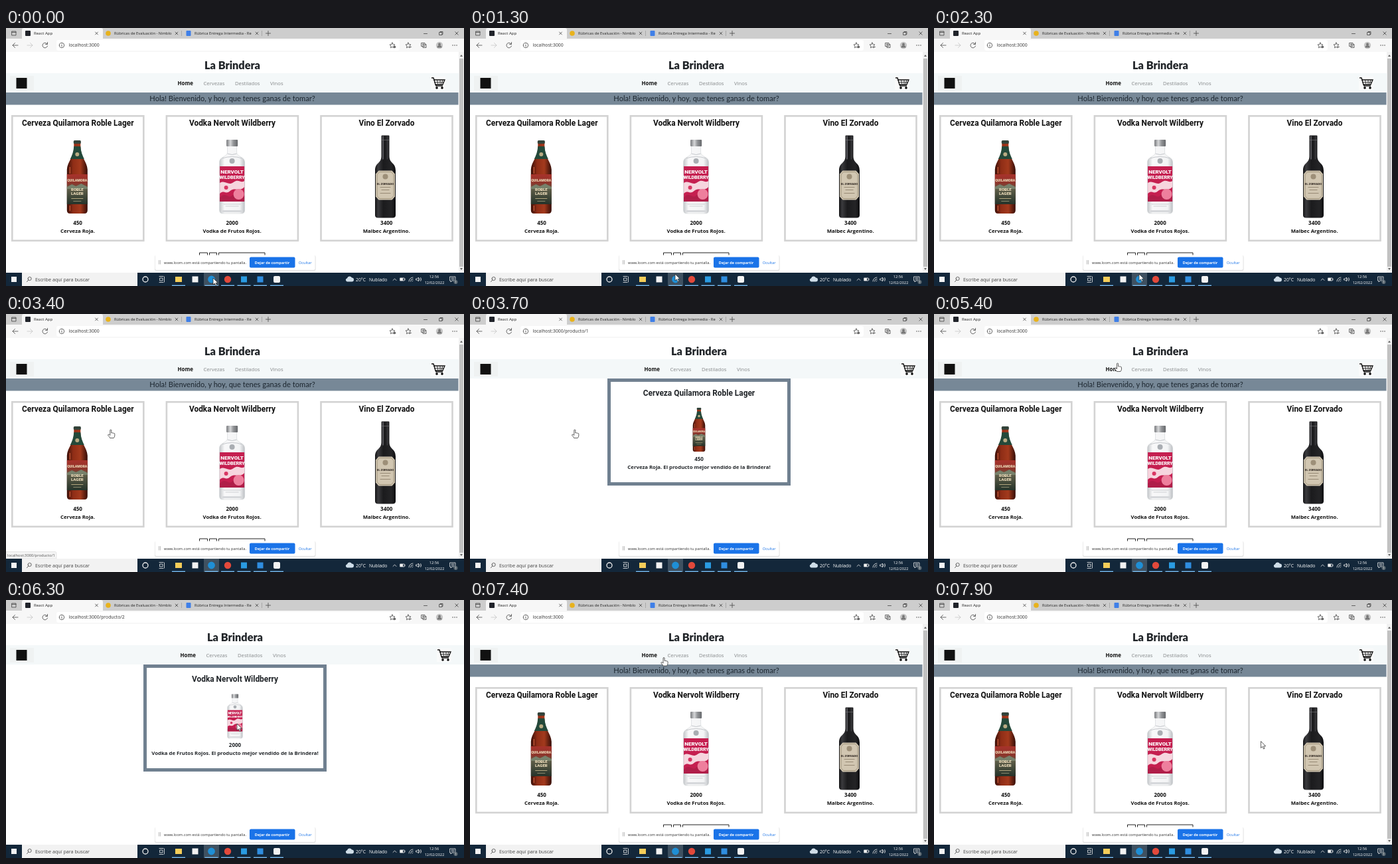
Recreate the animation shown at these times as an HTML page. Size 690 px wide and 388 px high, loop 8000 ms.

```html
<!DOCTYPE html>
<html lang="es">
<head>
<meta charset="utf-8">
<title>Tienda</title>
<style>
html, body { margin: 0; width: 100%; height: 100%; overflow: hidden; background: #fff; }
svg { display: block; width: 690px; height: 388px; }
text { font-family: "Open Sans", "Noto Sans", sans-serif; white-space: pre; }
.b { font-weight: 700; }
.m { text-anchor: middle; }
.brand { font: 900 16.3px Lato, sans-serif; fill: #212529; }
.hello { font: 11.1px Lato, sans-serif; fill: #1c262f; }
.name { font: 700 11.9px Roboto, sans-serif; }
.tag { font-family: Roboto, sans-serif; font-weight: 900; }
.i { fill: none; stroke: #444; stroke-width: .8; stroke-linecap: round; stroke-linejoin: round; }
.w { stroke: #eee; }
</style>
</head>
<body>
<svg id="stage" viewBox="0 0 690 388">
  <defs>
    <linearGradient id="amber">
      <stop offset="0" stop-color="#3a0f08"/><stop offset=".3" stop-color="#8f2d16"/>
      <stop offset=".65" stop-color="#a33a1d"/><stop offset="1" stop-color="#350d07"/>
    </linearGradient>
    <linearGradient id="clear">
      <stop offset="0" stop-color="#c3c6c9"/><stop offset=".2" stop-color="#f8f8f9"/>
      <stop offset=".8" stop-color="#f3f4f5"/><stop offset="1" stop-color="#bcbfc3"/>
    </linearGradient>
    <linearGradient id="metal">
      <stop offset="0" stop-color="#77797c"/><stop offset=".35" stop-color="#d6d7d9"/>
      <stop offset=".6" stop-color="#96989b"/><stop offset="1" stop-color="#66686b"/>
    </linearGradient>
    <linearGradient id="dark">
      <stop offset="0" stop-color="#141416"/><stop offset=".15" stop-color="#3a3a3d"/>
      <stop offset=".4" stop-color="#1b1b1d"/><stop offset=".8" stop-color="#242426"/>
      <stop offset="1" stop-color="#0d0d0f"/>
    </linearGradient>
    <linearGradient id="land" x2="0" y2="1">
      <stop offset="0" stop-color="#a8322b"/><stop offset=".3" stop-color="#8c352b"/>
      <stop offset=".5" stop-color="#5e5d48"/><stop offset="1" stop-color="#25332a"/>
    </linearGradient>

    <g id="beer">
      <path d="M-5 3V10C-5 25-15 32-15.500 44V105Q-15.500 110-11 110H11Q15.500 110 15.500 105V44C15 32 5 25 5 10V3Z" fill="url(#amber)"/>
      <rect x="-5.5" width="11" height="5" rx="1.5" fill="#33433a"/>
      <path d="M-5 9H5C5.500 17 8 23 10.500 28H-10.500C-8 23-5.500 17-5 9Z" fill="#24493a"/>
      <circle cy="21" r="3" fill="#b9ab83"/>
      <rect x="-15.5" y="51" width="31" height="45" fill="url(#land)"/>
      <path d="M-15.500 70L-8 66L-2 69L6 65L15.500 70V73H-15.500Z" fill="#77816b"/>
      <g fill="#f0dfbd" text-anchor="middle">
        <text class="tag" y="62" font-size="5.2">QUILAMORA</text>
        <text class="tag" y="76" font-size="6">ROBLE</text>
        <text class="tag" y="82" font-size="6">LAGER</text>
      </g>
      <rect x="-9" y="87" width="18" height="1" fill="#b3a67e"/>
      <rect x="-6" y="91" width="12" height="1" fill="#8b8a6d"/>
      <path d="M-11 40V50M-11 98V106" stroke="#d0603e" stroke-width="1.2"/>
    </g>

    <g id="vodka">
      <path d="M-7 10V20C-7 27-19 26-19 35V107Q-19 112-14 112H14Q19 112 19 107V35C19 26 7 27 7 20V10Z" fill="url(#clear)" stroke="#c9cccf" stroke-width=".5"/>
      <rect x="-8.5" y="1" width="17" height="10" rx="1" fill="url(#metal)"/>
      <path d="M-7 22Q0 25 7 22M-15 29Q0 24 15 29" fill="none" stroke="#b9bcc0" stroke-width=".8"/>
      <circle cy="33" r="4" fill="#a9adb2"/>
      <rect x="-18.5" y="41" width="37" height="53" fill="#c51f50"/>
      <path d="M-18.500 66C-10 61-6 71 2 65S13 67 18.500 63V72C12 80 4 72-3 78S-12 76-18.500 82Z" fill="#f6d5de"/>
      <path d="M-18.500 88C-9 78-6 91 0 85S7 91 18.500 86V94H-18.500Z" fill="#b01e49"/>
      <circle cx="10" cy="83" r="8" fill="#ee7f9d"/>
      <circle cx="-9" cy="73" r="3" fill="#d93763"/>
      <g fill="#fff" text-anchor="middle">
        <text class="tag" y="52" font-size="8">NERVOLT</text>
        <text class="tag" y="60" font-size="7">WILDBERRY</text>
      </g>
      <path d="M-13 98H13M-10 101H10" stroke="#c3c6ca" stroke-width=".8"/>
      <rect x="-15" y="107" width="30" height="3" rx="1.5" fill="#d6d8db"/>
    </g>

    <g id="wine">
      <path d="M-6 1Q-6 0-5 0H5Q6 0 6 1V31C6 43 15.500 40 15.500 53V120Q15.500 124 11 124H-11Q-15.500 124-15.500 120V53C-15.500 40-6 43-6 31Z" fill="url(#dark)"/>
      <path d="M-3.500 1V36" stroke="#55555a" stroke-width="2"/>
      <path d="M3 1V36" stroke="#37373a" stroke-width="2"/>
      <path d="M-6 7H6" stroke="#77777b" stroke-width=".6"/>
      <path d="M-10 53H10L14.500 58V92L10 97H-10L-14.500 92V58Z" fill="#d1c6b1"/>
      <path d="M-9 55H9L12.500 59V91L9 95H-9L-12.500 91V59Z" fill="none" stroke="#85775f" stroke-width=".6"/>
      <circle cy="62" r="4" fill="#9d8f78"/>
      <text class="tag m" y="74" font-size="4.3" fill="#342c25">EL ZORVADO</text>
      <path d="M-8 78H8M-6 82H6M-8 87H8" stroke="#8b7d68" stroke-width=".8"/>
    </g>

    <path id="arrow" d="M0 0V10L2.400 7.900L4 11.500L5.600 10.800L4.100 7.300H7.200Z" fill="#fff" stroke="#222" stroke-width=".7"/>
    <path id="hand" d="M-1 0Q0-1 1 0V4.400Q2 3.500 3 4.700Q4 3.900 4.700 5Q6 4.700 6 6.200V8.500Q5.800 10.500 4.500 12H-1.200Q-2 10-4.200 7.800Q-4.200 6.200-2.500 6.700L-1 7.900Z" fill="#fff" stroke="#222" stroke-width=".7"/>
  </defs>

  <rect width="690" height="388" fill="#fff"/>
  <g id="page"></g>
  <g id="chrome"></g>
  <g id="status">
    <path d="M0 357.500H74Q76 357.500 76 359.500V368H0Z" fill="#f4f4f4" stroke="#d8d8d8" stroke-width=".6"/>
    <text x="2" y="364.700" font-size="5.85" fill="#555">localhost:3000/producto/1</text>
  </g>
  <g id="share"></g>
  <g id="bar"></g>
  <use id="pointer"/>
</svg>

<script>
const $ = id => document.getElementById(id);
const text = (x, y, size, str, fill = '#222', cls = '') =>
  `<text x="${x}" y="${y}" font-size="${size}" fill="${fill}" class="${cls}">${str}</text>`;
const rect = (x, y, w, h, fill, rx = 0) =>
  `<rect x="${x}" y="${y}" width="${w}" height="${h}" rx="${rx}" fill="${fill}"/>`;
const dot = (x, y, r, fill) => `<circle cx="${x}" cy="${y}" r="${r}" fill="${fill}"/>`;
const line = (d, cls = '') => `<path class="i ${cls}" d="${d}"/>`;
const cross = (x, y, r = 1.9) => line(`M${x - r} ${y - r}l${2 * r} ${2 * r}m0 ${-2 * r}l${-2 * r} ${2 * r}`);

const drinks = [
  { id: 'beer', name: 'Cerveza Quilamora Roble Lager', price: 450, about: 'Cerveza Roja.', x: 107.3, top: 169 },
  { id: 'vodka', name: 'Vodka Nervolt Wildberry', price: 2000, about: 'Vodka de Frutos Rojos.', x: 340.6, top: 167 },
  { id: 'wine', name: 'Vino El Zorvado', price: 3400, about: 'Malbec Argentino.', x: 571.5, top: 161.5 }
];

function cart(x) {
  return rect(x - 11, 73, 22, 20, '#fafbfb') +
    `<g transform="translate(${x} 83)"><path d="M-10-8H-7L-3 4H7" fill="none" stroke="#111" stroke-width="1.5"/>
    <path d="M-6-5H10L7 2H-4Z" fill="#fff" stroke="#111" stroke-width="1.3"/>
    <path d="M-5-1.500H8M-1.500-5L0 2M3-5V2M7-5L5 2" stroke="#111" stroke-width=".8"/>
    <circle cx="-2" cy="7" r="1.800"/><circle cx="6" cy="7" r="1.800"/></g>`;
}

// Everything is centred on the viewport, which is narrower with a scrollbar.
function header(width) {
  const c = width / 2;
  return text(c, 62, 16.3, 'La Brindera', '#212529', 'brand m') +
    rect(0, 68, width, 29, '#f4f8f9') +
    rect(6, 72, 36, 22, '#eff2f2') + rect(15.5, 75, 16, 16, '#111') +
    text(c - 82.5, 85.5, 7.9, 'Home', '#111', 'b') +
    text(c - 43.5, 85.5, 7.7, 'Cervezas', '#85888a') +
    text(c + 4, 85.5, 7.7, 'Destilados', '#85888a') +
    text(c + 57, 85.5, 7.7, 'Vinos', '#85888a') +
    cart(width === 690 ? 660 : 651);
}

function homePage() {
  const cards = drinks.map((d, i) => {
    const c = 108 + i * 232.6;
    return `<rect x="${c - 98.7}" y="132.300" width="198" height="187.500" fill="#fff" stroke="#d3d3d3" stroke-width="2.6"/>
      <use href="#${d.id}" transform="translate(${d.x} ${d.top})"/>` +
      text(c + .3, 147, 11.9, d.name, '#111', 'name m') +
      text(c, 295.5, 8, d.price, '#111', 'b m') +
      text(c, 307.5, 7.8, d.about, '#111', 'b m');
  }).join('');
  const pager = '<path d="M291.500 350V338H303.500V350M306.500 350V338H317.500V350M320.500 350V338H390V350" fill="#fff" stroke="#222"/>';
  const scroll = rect(682, 36, 8, 332, '#f1f1f1') + rect(683, 46, 6, 313, '#c1c1c1') +
    '<path d="M684 43h4l-2-3zM684 361h4l-2 3z" fill="#666"/>';
  return header(682) + rect(0, 97, 681.5, 18.5, '#778897') +
    text(341, 110, 11.1, 'Hola! Bienvenido, y hoy, que tenes ganas de tomar?', '', 'hello m') +
    cards + pager + scroll;
}

function productPage(d) {
  return header(690) +
    '<rect x="209.500" y="99.500" width="271" height="156" fill="#fff" stroke="#708090" stroke-width="5"/>' +
    text(345, 123, 11.9, d.name, '#212529', 'name m') +
    `<use href="#${d.id}" transform="translate(345 141) scale(.6)"/>` +
    text(345, 221, 8, d.price, '#212529', 'b m') +
    text(345, 233, 7.8, d.about + ' El producto mejor vendido de la Brindera!', '#212529', 'b m');
}

function browser() {
  const star = (x, y) => `M${x} ${y - 4}l1.2 2.600 2.800.4-2 2 .5 2.800-2.500-1.300-2.500 1.300.5-2.800-2-2 2.800-.4z`;
  return rect(0, 0, 690, 17, '#cdcdcd') + rect(0, 16, 690, 20, '#f7f7f7') +
    '<path d="M24 17V3Q24 0 27 0H143Q146 0 146 3V17Z" fill="#f7f7f7"/>' +
    line('M9 5h6v6h-6zM9 6.500h6') + rect(29, 4, 8, 8, '#20232a', 1) +
    text(42, 10.3, 6, 'React App') + cross(136.500, 8) +
    dot(154, 8, 3.8, '#e8b21c') + text(163, 10.3, 5.8, 'Rúbricas de Evaluación - Nimblo') + cross(257, 8) +
    rect(271.500, 4, 7, 8, '#3f7fe8', 1) + text(284, 10.3, 5.8, 'Rúbrica Entrega Intermedia - Re') + cross(378, 8) +
    rect(264, 4, .7, 8, '#999') + rect(385, 4, .7, 8, '#999') +
    line('M391.500 8h7m-3.500-3.500v7') +
    line('M629.500 8.500h5M653 6.500h4v4h-4zM654 6.500v-1h4v4h-1') + cross(679, 8, 2.2) +
    line('M18 26h-8m3.500-3.500l-3.500 3.500 3.500 3.500') +
    '<path class="i" style="stroke:#c4c4c4" d="M32 26h8m-3.500-3.500l3.500 3.500-3.500 3.500"/>' +
    line('M62 24a3.800 3.800 0 1 0 .5 3M62.500 21.500v3h-3') +
    rect(76, 18, 517, 16, '#fff', 3) +
    line('M80.300 26a3.700 3.700 0 1 0 7.400 0a3.700 3.700 0 1 0-7.400 0M84 25.500v2.300M84 24v.1') +
    `<text id="url" x="94.500" y="28.300" font-size="6.850" fill="#333"></text>` +
    line(star(582, 26)) + dot(585.5, 28.5, 1.8, '#666') +
    line(star(606, 26) + 'M608.500 28.500h2') +
    line('M626 22.500h5v5h-5zM628 27.500v2h5v-5h-2M628.500 23.700v2.600m-1.300-1.300h2.600') +
    dot(653, 26, 5.2, '#c6c6c6') + dot(653, 24.5, 1.9, '#777') +
    '<path d="M649.500 29.500a3.500 3.500 0 0 1 7 0z" fill="#777"/>' +
    [673, 676, 679].map(x => dot(x, 26, .7, '#333')).join('');
}

function sharing() {
  return rect(224, 342, 242.5, 23, '#dedede', 2) + rect(224.6, 341.6, 241, 22.4, '#fff', 2) +
    '<path class="i" style="stroke:#aaa" d="M230.500 349.500v5.500M232.500 349.500v5.500"/>' +
    text(238, 354.8, 5.7, 'www.loom.com está compartiendo tu pantalla.', '#333') +
    rect(367, 344.5, 68.5, 16, '#1a73e8', 2) +
    text(401, 354.6, 5.55, 'Dejar de compartir', '#fff', 'b m') +
    text(440.7, 354.8, 5.8, 'Ocultar', '#1a73e8');
}

function taskbar() {
  const runs = [260, 309.5, 334, 358.5, 383, 408].map(x => rect(x - 10, 386.6, 20, 1.4, '#76b9ed')).join('');
  return rect(0, 368, 690, 20, '#13273a') + rect(24, 368, 174, 20, '#f2f2f2') +
    rect(8, 374, 8, 8, '#f4f4f4') +
    line('M33 377a2.600 2.600 0 1 1 5.200 0a2.600 2.600 0 1 1-5.200 0M33.800 379l-2.300 2.600') +
    text(44, 380.7, 7.2, 'Escribe aquí para buscar', '#444') +
    '<circle class="i w" cx="210" cy="378" r="4" style="stroke-width:1.300"/>' +
    line('M232 376h4v4h-4zM231 373.500h6M231 382.500h6M238.500 374v8', 'w') +
    rect(298, 368, 23, 20, '#3f5161') +
    rect(255, 374, 10, 8, '#f5cd59') + rect(280.5, 373.5, 9, 9, '#f2f2f2') +
    dot(309.5, 378, 5.4, '#1f8fd6') + dot(334, 378, 5.2, '#e2493b') +
    rect(354, 373.5, 9, 9, '#2a9be2') + rect(378.5, 373.5, 9, 9, '#2f8de0') +
    rect(403, 373, 10, 10, '#f3f3f3', 2) + runs +
    '<path d="M514 381.500a2.700 2.700 0 0 1 0-5.300a3.800 3.800 0 0 1 7-.7a3 3 0 0 1 0 6z" fill="#cfdde8"/>' +
    text(527, 380.6, 6.8, '20°C', '#fff') + text(547, 380.6, 6.8, 'Nublado', '#fff') +
    line('M583 379.500l2.500-2.500 2.500 2.500M594 376h6v4h-6zM601 377v2', 'w') + rect(594, 376, 4, 4, '#eee') +
    line('M607 381a6 6 0 0 1 6-6M609.500 381a3.500 3.500 0 0 1 3.500-3.500M612 381l1-1', 'w') +
    line('M618 377h1.500l2-2v6l-2-2h-1.500zM623 376.500q1.200 1.500 0 3M624.800 375.500q2 2.500 0 5', 'w') +
    text(645, 375.6, 5.7, '12:56', '#fff', 'm') + text(645.5, 385, 5.6, '12/02/2022', '#fff', 'm') +
    line('M669 374h8v6h-5l-2 2v-2h-1zM671 376h4M671 378h4', 'w') +
    dot(677.5, 382, 3, '#5b6871') + text(677.5, 383.7, 4.5, '1', '#fff', 'm');
}

const pages = [homePage(), productPage(drinks[0]), productPage(drinks[1])];
const visits = [[0, 0], [3700, 1], [5400, 0], [6300, 2], [7300, 0]];
const hovers = [[3100, 3800], [5200, 5600], [6000, 6300], [7100, 7500]];
// Pointer stops: time, x, y
const stops = [
  [0, 312, 376], [300, 309, 370], [2700, 309, 370], [2900, 268, 214], [3100, 157.8, 174.5],
  [4200, 157.8, 174.5], [4700, 278, 105], [4900, 281, 62], [5100, 276.5, 74.5],
  [5400, 276.5, 74.5], [6000, 348, 186], [6300, 348, 186], [7100, 276, 77],
  [7300, 276, 77], [7900, 492.5, 212.5], [8000, 492.5, 212.5]
];

function pointerAt(t) {
  const i = Math.max(1, stops.findIndex(s => s[0] > t));
  const [a, b] = [stops[i - 1], stops[i]];
  const k = (t - a[0]) / (b[0] - a[0]);
  const e = k * k * (3 - 2 * k);
  return [a[1] + (b[1] - a[1]) * e, a[2] + (b[2] - a[2]) * e];
}

$('chrome').innerHTML = browser();
$('share').innerHTML = sharing();
$('bar').innerHTML = taskbar();

let shown = -1;
function draw(t) {
  const page = visits.filter(v => v[0] <= t).pop()[1];
  if (page !== shown) {
    shown = page;
    $('page').innerHTML = pages[page];
    $('url').textContent = 'localhost:3000' + (page ? '/producto/' + page : '');
  }
  $('status').style.display = t >= 3300 && t < 3700 ? '' : 'none';
  const [x, y] = pointerAt(t);
  const hand = hovers.some(h => t >= h[0] && t < h[1]);
  $('pointer').setAttribute('href', hand ? '#hand' : '#arrow');
  $('pointer').setAttribute('transform', `translate(${x} ${y})`);
}

const start = performance.now();
function tick() {
  const t = (performance.now() - start) % 8000;
  draw(Math.floor(t / 100) * 100);
  requestAnimationFrame(tick);
}
tick();
</script>
</body>
</html>
```
